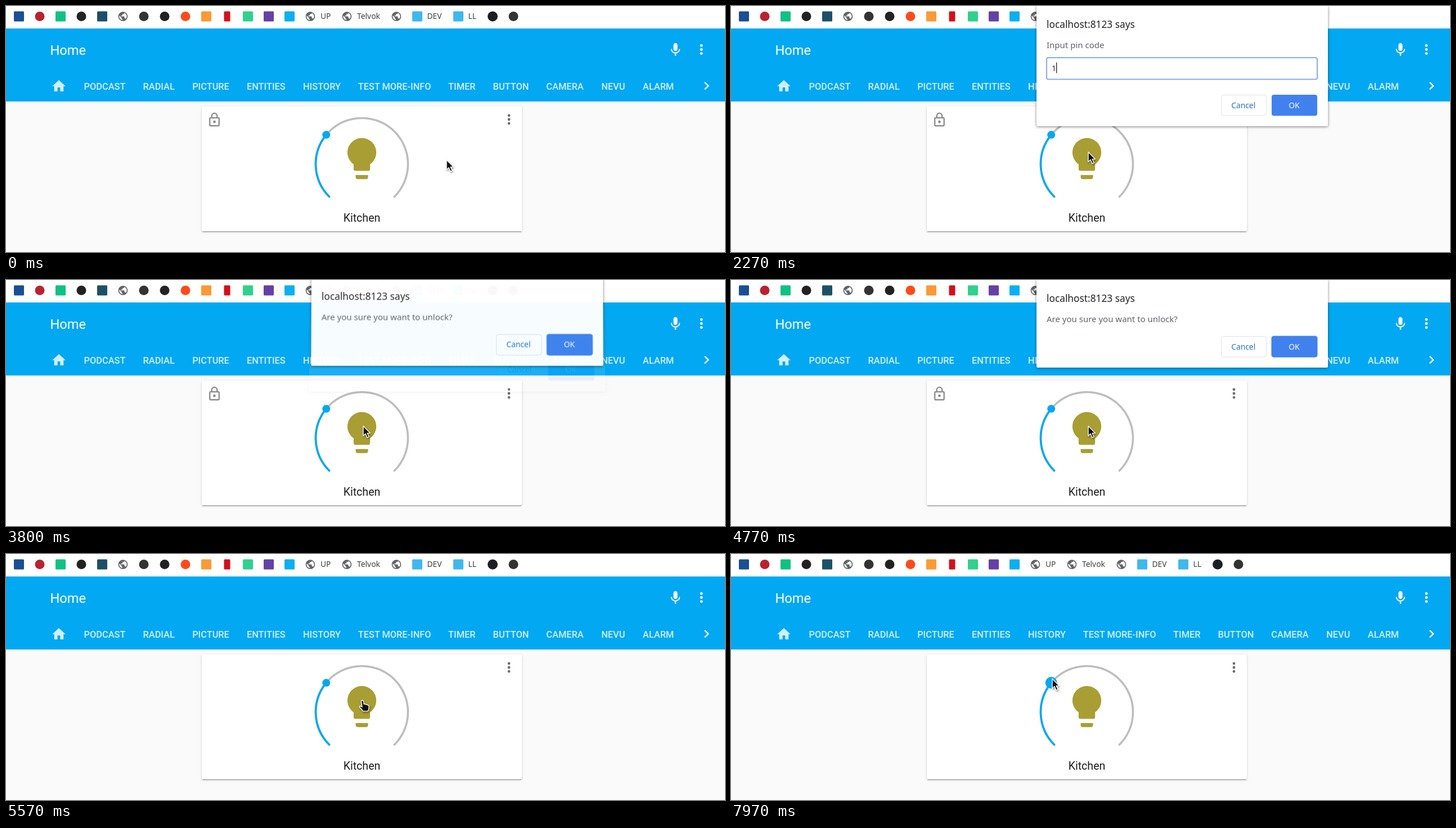
Animation, 1278 px wide and 438 px high, one loop 8 s. Source, as an HTML page:

```html
<!DOCTYPE html>
<html lang="en">
<head>
<meta charset="utf-8">
<title>Locked light card</title>
<style>
html, body { margin: 0; width: 100%; height: 100%; overflow: hidden; background: #fafafa; }
#stage { position: absolute; left: 0; top: 0; width: 1278px; height: 438px; overflow: hidden; }
#stage > * { position: absolute; left: 0; top: 0; }
#stage > .card { left: 348px; top: 179px; width: 569px; height: 222px; background: #fff; border-radius: 2px;
  box-shadow: 0 2px 2px rgba(0,0,0,.14), 0 1px 5px rgba(0,0,0,.12), 0 3px 1px -2px rgba(0,0,0,.2); }
#stage > .dialog { left: 543px; background: #fff; border-radius: 0 0 2px 2px; transform-origin: 50% 0;
  box-shadow: 0 1px 5px rgba(0,0,0,.5); }
text { font-family: "Noto Sans", "Open Sans", sans-serif; font-size: 13.85px; }
.mid { text-anchor: middle; }
.roboto text { font-family: Roboto, sans-serif; }
.roboto .tab { font-size: 16.4px; font-weight: 500; text-anchor: middle; }
.title { font-size: 17.3px; fill: #202124; }
.note { font-size: 15px; fill: #5f6368; }
.arc { fill: none; stroke-width: 3.6; stroke-linecap: round; }
</style>
</head>
<body>
<div id="stage">
  <div class="card"></div>
  <svg width="1278" height="438">
    <defs>
      <path id="globe" d="M12 2C6.48 2 2 6.48 2 12s4.48 10 10 10 10-4.48 10-10S17.52 2 12 2zm-1 17.93c-3.95-.49-7-3.85-7-7.93 0-.62.08-1.21.21-1.79L9 15v1c0 1.1.9 2 2 2v1.93zm6.9-2.54c-.26-.81-1-1.39-1.9-1.39h-1v-3c0-.55-.45-1-1-1H8v-2h2c.55 0 1-.45 1-1V7h2c1.1 0 2-.9 2-2v-.41c2.93 1.19 5 4.06 5 7.41 0 2.08-.8 3.97-2.1 5.39z"/>
      <g id="dots"><circle cy="-7.1" r="2.4"/><circle r="2.4"/><circle cy="7.1" r="2.4"/></g>
    </defs>
    <rect width="1278" height="40" fill="#fff"/>
    <rect y="40" width="1278" height="130" fill="#02a8f2"/>
    <g id="bookmarks" fill="#3c4043"></g>
    <g class="roboto" fill="#fff">
      <text x="78.4" y="87" style="font-size:23.7px">Home</text>
      <path transform="translate(1175.8 63.6) scale(1.18)" d="M12 14c1.66 0 2.99-1.34 2.99-3L15 5c0-1.66-1.34-3-3-3S9 3.34 9 5v6c0 1.66 1.34 3 3 3zm5.3-3c0 3-2.54 5.1-5.3 5.1S6.7 14 6.7 11H5c0 3.41 2.72 6.23 6 6.72V21h2v-3.28c3.28-.48 6-3.3 6-6.72h-1.7z"/>
      <use href="#dots" x="1236" y="77.5"/>
      <path transform="translate(1231 128) scale(1.18)" d="M10 6L8.59 7.41 13.17 12l-4.58 4.59L10 18l6-6z"/>
      <g id="tabs" opacity=".82">
        <path transform="translate(79.8 128.5) scale(1.18)" d="M10 20v-6h4v6h5v-8h3L12 3 2 12h3v8z"/>
      </g>
      <text class="mid" x="632.5" y="384" fill="#1c1c1c" style="font-size:19.6px">Kitchen</text>
    </g>
    <path id="lock" fill="#8c8c8c" transform="translate(356.3 188.5) scale(1.18)" d="M12 17a2 2 0 0 1 0-4 2 2 0 0 1 0 4M18 20V10H6V20H18M18 8A2 2 0 0 1 20 10V20A2 2 0 0 1 18 22H6A2 2 0 0 1 4 20V10A2 2 0 0 1 6 8H7V6A5 5 0 0 1 17 6V8H18M12 3A3 3 0 0 0 9 6V8H15V6A3 3 0 0 0 12 3Z"/>
    <use href="#dots" x="894" y="202" fill="#6e6e6e"/>
    <path class="arc" stroke="#bdbdbd" d="M574.6 339.5A82 82 0 1 1 690.4 339.5"/>
    <path class="arc" id="level" stroke="#02a8f2" pathLength="1" d="M574.6 339.5A82 82 0 1 1 690.4 339.5"/>
    <circle id="knob" fill="#02a8f2"/>
    <path id="bulb" transform="translate(588.6 227.7) scale(3.66)" d="M12 2A7 7 0 0 0 5 9C5 11.38 6.19 13.47 8 14.74V17A1 1 0 0 0 9 18H15A1 1 0 0 0 16 17V14.74C17.81 13.47 19 11.38 19 9A7 7 0 0 0 12 2M9 21A1 1 0 0 0 10 22H14A1 1 0 0 0 15 21V20H9Z"/>
  </svg>

  <svg class="dialog" id="prompt" width="518" height="214" viewBox="543 0 518 214">
    <text class="title" x="561" y="39">localhost:8123 says</text>
    <text class="note" x="561" y="75">Input pin code</text>
    <rect x="561" y="92" width="481" height="38.5" rx="3" fill="#fff" stroke="#8aabee" stroke-width="2"/>
    <text id="pin" x="570" y="116" fill="#333" style="font-size:14px"></text>
    <rect id="caret" y="100.5" width="1.3" height="19" fill="#222"/>
    <g class="buttons" transform="translate(0 158)"></g>
  </svg>
  <svg class="dialog" id="confirm" width="518" height="156" viewBox="543 0 518 156">
    <text class="title" x="561" y="39">localhost:8123 says</text>
    <text class="note" x="561" y="75">Are you sure you want to unlock?</text>
    <rect x="960" y="99" width="83" height="39" rx="5" fill="#9dbdf6"/>
    <g class="buttons" transform="translate(0 100)"></g>
  </svg>

  <svg width="1278" height="438">
    <g id="cursor" fill="#111" stroke="#fff" stroke-width="1.4" stroke-linejoin="round" style="filter:drop-shadow(1px 2px 1.5px rgba(0,0,0,.4))">
      <path id="arrow" d="M0 0V17.5L4 13.8 7 20.6 10.2 19.2 7.2 12.6H12.4Z"/>
      <path id="hand" d="M-2.2 1.8Q-1.8 0 0 .2T2 2.2L2.6 7Q4.6 6 5.6 7.6 7.6 6.9 8.6 8.5 11.4 8 11.5 11V14.5Q11 17 9.5 19.5H1Q-1 16-4.6 13-6 10.5-3.6 10.2L-.6 12Z"/>
    </g>
  </svg>
</div>
<script>
const $ = id => document.getElementById(id);
const clamp = v => Math.min(1, Math.max(0, v));
const easeOut = v => 1 - (1 - v) ** 3;
const smooth = v => v * v * (3 - 2 * v);

// Bookmark icons stand 37 px apart, then come the labelled ones.
const square = (x, color, w = 18) => `<rect x="${x - w / 2}" y="9.5" width="${w}" height="18" rx="1.5" fill="${color}"/>`;
const circle = (x, color, r = 8.5) => `<circle cx="${x}" cy="18.5" r="${r}" fill="${color}"/>`;
const globe = x => `<use href="#globe" fill="#5f6368" transform="translate(${x - 10} 8.5) scale(.83)"/>`;
const label = (x, s) => `<text x="${x}" y="23">${s}</text>`;
$('bookmarks').innerHTML = [
  square(23, '#1a4f94'), circle(60, '#b8232f'), square(97, '#10c183'), circle(134, '#222'), square(171, '#1d5068'),
  globe(208), circle(245, '#333'), circle(282, '#222'), circle(319, '#ff4a1c'), square(356, '#fb9a36'),
  square(393, '#d3101c', 11), square(430, '#2fd18c'), square(467, '#6441a5'), square(504, '#0cafef'),
  globe(541), label(559, 'UP'), globe(606), label(624, 'Telvok'), globe(694),
  square(731, '#3fb8ee'), label(748.5, 'DEV'), square(804, '#3fb8ee'), label(821.5, 'LL'),
  circle(865, '#1b1f23', 9), circle(902, '#333')
].join('');

const tabs = { PODCAST: 175.5, RADIAL: 271.7, PICTURE: 364, ENTITIES: 462.3, HISTORY: 561.5, 'TEST MORE-INFO': 690.7,
  TIMER: 810.3, BUTTON: 897.5, CAMERA: 993.5, NEVU: 1079.3, ALARM: 1159.5 };
for (const [name, x] of Object.entries(tabs))
  $('tabs').insertAdjacentHTML('beforeend', `<text class="tab" x="${x}" y="149">${name}</text>`);

for (const g of document.querySelectorAll('.buttons'))
  g.innerHTML = `<rect x="871.5" y=".5" width="80" height="36.5" rx="4" fill="none" stroke="#dfe1e5"/>
    <text class="mid" x="910.7" y="23.5" fill="#2a70d0">Cancel</text>
    <rect x="961" width="81" height="37.5" rx="4" fill="#4081ee"/>
    <text class="mid" x="1001" y="23.5" fill="#fff">OK</text>`;

// Cursor stops: time, x, y
const stops = [[0, 783, 274], [15, 783, 274], [830, 635, 260], [5550, 635, 260], [5930, 471, 300], [6330, 632, 253],
  [7480, 632, 253], [7730, 571, 222], [8000, 571, 222]];

function cursorAt(t) {
  const i = stops.findIndex(s => s[0] > t);
  const [a, b] = [stops[i - 1], stops[i]];
  const k = smooth((t - a[0]) / (b[0] - a[0]));
  return [a[1] + (b[1] - a[1]) * k, a[2] + (b[2] - a[2]) * k];
}

// A dialog swings down into place and swings back up while it fades.
function sheet(id, t, open, openFor, close, closeFor) {
  const away = t < close ? 1 - easeOut(clamp((t - open) / openFor)) : easeOut(clamp((t - close) / closeFor));
  const style = $(id).style;
  style.visibility = away < 1 ? 'visible' : 'hidden';
  style.opacity = 1 - away * away;
  style.transform = away ? `translateY(${-20 * away}px) perspective(800px) rotateX(${4.2 * away}deg)` : 'none';
}

function draw(t) {
  sheet('prompt', t, 1295, 300, 3650, 240);
  sheet('confirm', t, 3670, 300, 4800, 300);

  const typed = t < 2270 ? 0 : Math.min(4, 1 + Math.floor((t - 2270) / 200));
  $('pin').textContent = '1234'.slice(0, typed);
  $('caret').setAttribute('x', 570 + 8 * typed);
  $('caret').style.opacity = +(t < 1770 || t >= 2270 && t < 3370);

  $('lock').style.opacity = 1 - easeOut(clamp((t - 4770) / 560));

  // The light goes off and on again.
  const level = t >= 6570 && t < 7070 ? 0 : .313;
  const angle = (135 + 270 * level) * Math.PI / 180;
  $('level').setAttribute('stroke-dasharray', `${level} 2`);
  $('knob').setAttribute('cx', 632.5 + 82 * Math.cos(angle));
  $('knob').setAttribute('cy', 281.5 + 82 * Math.sin(angle));
  $('knob').setAttribute('r', t >= 7970 ? 10.5 : 7);
  const off = clamp((t - 6540) / 160) - clamp((t - 7040) / 130);
  const mix = (a, b) => Math.round(a + (b - a) * off);
  $('bulb').setAttribute('fill', `rgb(${mix(168, 68)},${mix(158, 115)},${mix(51, 158)})`);

  const [x, y] = cursorAt(t);
  const overBulb = x > 607 && x < 658 && (t < 1000 || t > 4860);
  $('cursor').setAttribute('transform', `translate(${x} ${y})`);
  $('arrow').style.display = overBulb ? 'none' : '';
  $('hand').style.display = overBulb ? '' : 'none';
}

const start = performance.now();
function tick() {
  draw((performance.now() - start) % 8000);
  requestAnimationFrame(tick);
}
tick();
</script>
</body>
</html>
```
